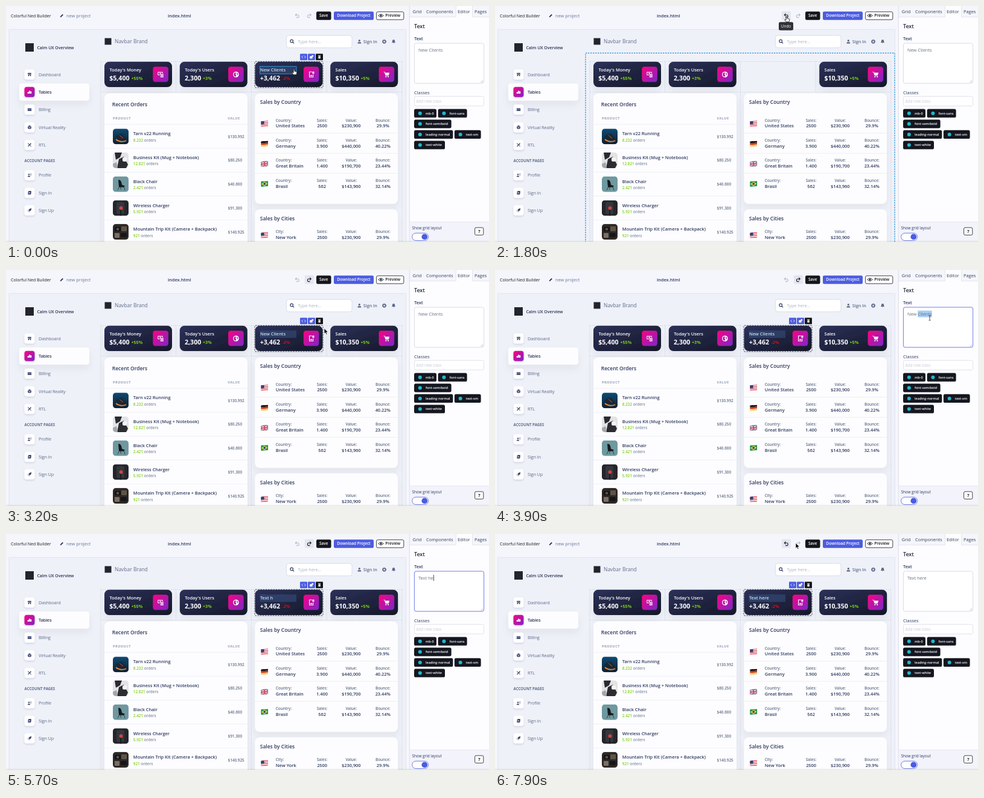
An HTML page that plays this animation: 800x393 px, repeating every 8000 ms.

```html
<!DOCTYPE html>
<html lang="en">
<head>
<meta charset="utf-8">
<title>Page builder</title>
<style>
  html, body { margin: 0; width: 100%; height: 100%; overflow: hidden; background: #f5f6fc; }
  svg { display: block; width: 100vw; height: 100vh; }
  text { font-family: "Open Sans", "Noto Sans", sans-serif; white-space: pre; }
</style>
</head>
<body>
<svg id="stage" viewBox="0 0 800 393" xmlns="http://www.w3.org/2000/svg"></svg>
<script>
const INK = '#2e3a5e', SOFT = '#5f6c88', MUTED = '#7d8ca6', LIME = '#7ed016';
const BLUE = '#4c5ce0', BLACK = '#14161c';
const LOOP = 8000, TYPE_START = 4780, KEY_GAP = 140, LAG = 150;
const OLD_TEXT = 'New Clients', NEW_TEXT = 'Text here';

const text = (x, y, s, size = 7.42, fill = INK, weight = 400, extra = '') =>
  `<text x="${x}" y="${y}" font-size="${size}" fill="${fill}" font-weight="${weight}" ${extra}>${s}</text>`;
const mid = (x, y, s, size, fill, weight) => text(x, y, s, size, fill, weight, 'text-anchor="middle"');
const rect = (x, y, w, h, fill, r = 0, extra = '') =>
  `<rect x="${x}" y="${y}" width="${w}" height="${h}" rx="${r}" fill="${fill}" ${extra}/>`;
const box = (x, y, w, h, fill, stroke, r = 3) =>
  rect(x, y, w, h, fill, r, `stroke="${stroke}" stroke-width=".8"`);
const circle = (x, y, r, fill, extra = '') => `<circle cx="${x}" cy="${y}" r="${r}" fill="${fill}" ${extra}/>`;
const path = (d, fill, extra = '') => `<path d="${d}" fill="${fill}" ${extra}/>`;
const line = (d, stroke, w = .8, extra = '') =>
  path(d, 'none', `stroke="${stroke}" stroke-width="${w}" ${extra}`);
const group = (s, attr) => `<g ${attr}>${s}</g>`;
const at = (x, y, s, scale = 1) => group(s, `transform="translate(${x} ${y}) scale(${scale})"`);

// Icon shapes live in an 8 by 8 box.
const shapes = {
  shop: 'M.6 .8H7.4L8 3H0ZM1 3.6H7V7.5H5V5H3V7.5H1Z',
  bars: 'M0 3.5H2.4V7.5H0ZM2.9 1H5.1V7.5H2.9ZM5.6 2.5H8V7.5H5.6Z',
  card: 'M0 1.2H8V2.8H0ZM0 3.6H8V6.8H0Z',
  cube: 'M4 0L7.4 1.8L4 3.6L.6 1.8ZM.4 2.5L3.6 4.2V8L.4 6.2ZM7.6 2.5L4.4 4.2V8L7.6 6.2Z',
  tools: 'M1 .2L7.8 7L7 7.8L.2 1ZM6.4 .2L7.8 1.6L4.9 4.3L3.7 3.1ZM3 4L4 5L1.6 7.8L.2 6.4Z',
  person: 'M2.8 .8A1.6 1.6 0 1 1 2.79 .8ZM0 7.5C0 4 5.6 4 5.6 7.5ZM5.6 1H8V2H5.6ZM5.6 3H8V4H5.6Z',
  page: 'M1.8 .4H7.4V6H6.4V7.6H.8V2H1.8ZM2.2 3.2H5.4V4H2.2ZM2.2 5H4.6V5.8H2.2Z',
  rocket: 'M8 0C5 0 3 1.5 2 3.5L4.5 6C6.5 5 8 3 8 0ZM1.5 3L0 4.5L1.5 4.8ZM5 6.5L3.5 8L3.2 6.5ZM1.5 5.5L2.5 6.5L.5 7.5Z',
  money: 'M0 .5H7V3H6.2V1.3H.8V4.2H3V5H0ZM3.6 3.6H8V4.6H3.6ZM3.6 5.3H8V6.3H3.6ZM3.6 7H8V8H3.6ZM2.6 2H4.4V3.4H2.6Z',
  globe: 'M4 0A4 4 0 1 1 3.99 0ZM3.4 1L4.2 2.4L3 3.6L4.4 4.8L3.8 7.1A3.1 3.1 0 0 1 3.4 1ZM5.2 1.4L7 3.4L6 5L5 3Z',
  report: 'M1 0H5V.9H1.9V7.1H6.1V4H7V8H1ZM2.8 4.8H5.2V6.2H2.8ZM5.6 0H8V3H5.6Z',
  cart: 'M0 .3H1.6L2 1.5H8L7 5H2.4L1.1 1.1H0ZM2.4 5.4H7V6H2.4ZM3.2 6.4A.8 .8 0 1 1 3.19 6.4ZM6.4 6.4A.8 .8 0 1 1 6.39 6.4Z',
  user: 'M4 0A2 2 0 1 1 3.99 0ZM.5 8V6.6C.5 4.2 7.5 4.2 7.5 6.6V8Z',
  bell: 'M4 0C6.4 0 6.6 2 6.6 4L7.7 6.2H.3L1.4 4C1.4 2 1.6 0 4 0ZM3 6.8H5A1 1 0 0 1 3 6.8Z',
  pencil: 'M0 8L.6 5.6L5.6 .6L7.4 2.4L2.4 7.4Z'
};
const icon = (name, cx, cy, size, fill) =>
  at(cx - size / 2, cy - size / 2, path(shapes[name], fill, 'fill-rule="evenodd"'), size / 8);

const defs = `<defs>
  <linearGradient id="dark" x1="1" y1="1" x2="0" y2="0"><stop stop-color="#141727"/><stop offset="1" stop-color="#2c3159"/></linearGradient>
  <linearGradient id="pink" x1="1" y1="1" x2="0" y2="0"><stop stop-color="#7928ca"/><stop offset="1" stop-color="#ff0080"/></linearGradient>
  <linearGradient id="sea" x1="0" y1="0" x2="0" y2="1"><stop stop-color="#0d4a76"/><stop offset="1" stop-color="#10202e"/></linearGradient>
  <linearGradient id="foot" x1="0" y1="0" x2="0" y2="1"><stop stop-color="#000" stop-opacity="0"/><stop offset="1" stop-color="#000" stop-opacity=".09"/></linearGradient>
  <filter id="shade" x="-25%" y="-60%" width="150%" height="260%"><feDropShadow dx="0" dy="7" stdDeviation="6" flood-color="#000" flood-opacity=".055"/></filter>
  <filter id="lift" x="-50%" y="-50%" width="200%" height="220%"><feDropShadow dx="0" dy="1.5" stdDeviation="1.6" flood-color="#1f2a4a" flood-opacity=".16"/></filter>
  <clipPath id="thumb"><rect width="26" height="26" rx="5"/></clipPath>
  <clipPath id="flag"><rect width="12" height="9" rx=".6"/></clipPath>
</defs>`;

function topBar() {
  const eye = line('M616.8 16Q621 11.4 625.2 16Q621 20.6 616.8 16Z', BLACK, .9) + circle(621, 16, 1.4, BLACK);
  return text(8, 18.7, 'Colorful Ned Builder', 7, '#181a22') +
    icon('pencil', 92.5, 16, 5.6, INK) + text(100, 18.7, 'new project', 7.42, '#65739a') +
    text(268, 18.7, 'index.html', 7.45, INK, 600) +
    rect(514, 9.3, 24.5, 13.9, BLACK, 2.2) + mid(526.2, 18.4, 'Save', 6.4, '#fff', 600) +
    rect(543, 9.3, 66, 13.9, BLUE, 2.2) + mid(576, 18.4, 'Download Project', 6.5, '#fff', 600) +
    box(613.6, 9.7, 45.2, 13.1, '#fff', BLACK, 2.2) + eye + text(628.3, 18.4, 'Preview', 6.6, BLACK, 600);
}

function sidebar() {
  const items = [['Dashboard', 'shop', 114], ['Tables', 'bars', 143.3], ['Billing', 'card', 172.6],
    ['Virtual Reality', 'cube', 202], ['RTL', 'tools', 231.3], ['Profile', 'person', 281.7],
    ['Sign In', 'page', 311], ['Sign Up', 'rocket', 340.3]];
  let s = rect(32, 62, 14, 14, '#22252e') + text(51.5, 71.7, 'Calm UX Overview', 6.9, '#262f4c', 600) +
    text(30.5, 260.4, 'ACCOUNT PAGES', 6.2, SOFT, 700) +
    rect(22, 129, 116, 28.4, '#fdfdff', 4.2, 'filter="url(#shade)"');
  for (const [name, shape, y] of items) {
    const on = name === 'Tables';
    s += rect(30.5, y - 8.5, 17, 17, on ? 'url(#pink)' : '#fff', 4, 'filter="url(#lift)"') +
      icon(shape, 39, y, 6.4, on ? '#fff' : '#3a416f') +
      text(54, y + 2.7, name, 7.42, on ? INK : SOFT, on ? 600 : 400, 'letter-spacing="-.18"');
  }
  return s;
}

const navbar = () =>
  rect(163.5, 53.5, 11, 11, '#22252e') + text(180, 62.3, 'Navbar Brand', 8.48, SOFT) +
  box(464.4, 49, 108.6, 20.6, '#fff', '#d2d6df', 4) +
  circle(473.2, 58.4, 2.3, 'none', `stroke="${INK}" stroke-width="1.1"`) + line('M475 60.2L477 62.4', INK, 1.2) +
  text(483.5, 62, 'Type here...', 7.2, '#a9b2c2') +
  icon('user', 585.3, 59.3, 6.6, SOFT) + text(591.7, 62, 'Sign In', 7.2, SOFT, 600) +
  circle(626.5, 59.3, 2.2, 'none', `stroke="${SOFT}" stroke-width="1.7"`) +
  circle(626.5, 59.3, 3.2, 'none', `stroke="${SOFT}" stroke-width="1" stroke-dasharray="1.35 1.16"`) +
  icon('bell', 642, 59.3, 6.6, SOFT);

function stat(x, label, value, rate, rateX, shape) {
  return rect(x, 92.7, 112, 42.4, 'url(#dark)', 8, 'filter="url(#shade)"') +
    text(x + 8.4, 109.4, label, 7.42, '#fff', 600, label === OLD_TEXT ? 'id="cardText"' : '') +
    text(x + 8.2, 123.5, value, 10.6, '#fff', 700) +
    text(rateX, 123.3, rate, 7.2, rate[0] === '-' ? '#ea0606' : LIME, 700) +
    rect(x + 80.3, 100.9, 25.6, 25.6, 'url(#pink)', 4.2) + icon(shape, x + 93.1, 114, 9.6, '#fff');
}

const photos = [
  rect(0, 0, 26, 26, 'url(#sea)') + path('M4 13L14 8L23 17L20 21L8 18Z', '#1b2733') +
    line('M5 18Q13 24 22 20', '#e8893b', 1.8) + line('M11 11L17 16', '#c9583a', 1),
  rect(0, 0, 26, 26, '#e2e4e6') + path('M3 0H15L12 8L5 12Z', '#2a2b2f') + path('M10 11L18 7L25 20L22 26H7Z', '#2c2d31') +
    rect(16, 8, 7, 7, '#f4f4f4', 2) + path('M0 19L6 16L8 26H0Z', '#a3a7aa'),
  rect(0, 0, 26, 26, '#6e999f') + path('M9 6Q14 5 15 14L20 16L18 18H10Z', '#16191c') +
    line('M11 17L8 23M13 17V22M18 17L20 23', '#22282b', .8),
  rect(0, 0, 26, 26, '#24262b') + rect(6, 3, 13, 20, '#33363d', 3) + circle(13.5, 13, 3, '#d0433c') +
    line('M13 16V26', '#15171a', 1.6),
  rect(0, 0, 26, 26, '#2d2825') + rect(3, 5, 10, 7, '#141414', 1) + circle(8, 8.5, 2.2, '#5b5754') +
    rect(14, 4, 9, 8, '#5f5347', 1) + rect(3, 15, 8, 8, '#7a6f64', 1) + rect(13, 15, 10, 7, '#151719', 1)
];

function orders() {
  const rows = [['Tarn v22 Running', '8.232', '$130.992'], ['Business Kit (Mug + Notebook)', '12.821', '$80.250'],
    ['Black Chair', '2.421', '$40.600'], ['Wireless Charger', '5.921', '$91.300'],
    ['Mountain Trip Kit (Camera + Backpack)', '921', '$140.925']];
  const head = 'letter-spacing=".5"';
  let s = rect(163, 145.4, 237, 270, '#fdfdff', 8.4, 'filter="url(#shade)"') +
    text(175.8, 166.7, 'Recent Orders', 8.48, INK, 600) +
    text(177, 188.6, 'PRODUCT', 5.5, '#929fb6', 700, head) + text(367.6, 188.6, 'VALUE', 5.5, '#929fb6', 700, head);
  rows.forEach(([name, count, value], i) => {
    const y = 217.3 + i * 39.7;
    s += line(`M163 ${y - 20}H400`, '#e9ebf2', .7) +
      at(177, y - 13, group(photos[i], 'clip-path="url(#thumb)"')) +
      text(210.8, y - 1.9, name, 7.42, INK, 600) +
      text(210.8, y + 8.4, `<tspan fill="${LIME}">${count}</tspan> orders`, 6.36, MUTED, 600) +
      text(367.6, y + 2.4, value, 6.36, SOFT, 600);
  });
  return s;
}

const bands = (colors, h) => colors.map((c, i) => rect(0, i * h, 12, h + .1, c)).join('');
const cross = (c, w) => line('M6 0V9M0 4.5H12', c, w);
const flags = {
  us: bands(['#d3303f', '#fff', '#d3303f', '#fff', '#d3303f', '#fff', '#d3303f'], 9 / 7) + rect(0, 0, 5.4, 5, '#2c3f83'),
  de: bands(['#15151a', '#dc2430', '#f8cc2e'], 3),
  gb: rect(0, 0, 12, 9, '#2a3c80') + line('M0 0L12 9M12 0L0 9', '#fff', 1.8) + line('M0 0L12 9M12 0L0 9', '#d02b3c', .6) +
    cross('#fff', 2.8) + cross('#d02b3c', 1.6),
  br: rect(0, 0, 12, 9, '#24964a') + path('M6 1L11 4.5L6 8L1 4.5Z', '#f8d433') + circle(6, 4.5, 1.9, '#2b4394')
};

function place(y, flag, label, name, ...cells) {
  let s = group(group(flags[flag], 'clip-path="url(#flag)"'), `transform="translate(422.2 ${y + 1.5}) skewY(-4)"`) +
    text(446.8, y + 2.2, label, 6.36, SOFT, 600) + text(446.8, y + 12, name, 7.42, INK, 600);
  [['Sales:', 523.6], ['Value:', 571.8], ['Bounce:', 624.3]].forEach(([title, x], i) => {
    s += mid(x, y + 2.2, title, 6.36, SOFT, 600) + mid(x, y + 12, cells[i], 7.42, INK, 600);
  });
  return s;
}

function sales() {
  const rows = [['us', 'Country:', 'United States', '2500', '$230,900', '29.9%'],
    ['de', 'Country:', 'Germany', '3.900', '$440,000', '40.22%'],
    ['gb', 'Country:', 'Great Britain', '1.400', '$190,700', '23.44%'],
    ['br', 'Country:', 'Brasil', '562', '$143,960', '32.14%']];
  let s = rect(412.3, 145.4, 236.7, 184.2, '#fdfdff', 8.4, 'filter="url(#shade)"') +
    text(420.8, 162.7, 'Sales by Country', 8.48, INK, 600);
  rows.forEach((row, i) => {
    const y = 190.4 + i * 33.4;
    if (i) s += line(`M412.3 ${y - 12}H649`, '#e6e8f0', .7);
    s += place(y, ...row);
  });
  return s + rect(412.3, 338.4, 236.7, 90, '#fdfdff', 8.4, 'filter="url(#shade)"') +
    text(420.8, 356.8, 'Sales by Cities', 8.48, INK, 600) +
    place(376, 'us', 'City:', 'New York', '2500', '$230,900', '29.9%');
}

function panel() {
  const tabs = [['Grid', 673.5], ['Components', 696], ['Editor', 748], ['Pages', 776]];
  const chips = [['mb-0', 676, 0, 37], ['font-sans', 715.6, 0, 48], ['font-semibold', 676, 1, 61.6],
    ['leading-normal', 676, 2, 64.3], ['text-sm', 742.8, 2, 43.8], ['text-white', 676, 3, 51]];
  let s = rect(668, 0, 132, 393, '#fdfdff') + rect(668, 0, 132, 18, '#f5f6fc') + rect(745.5, 0, 27, 18.6, '#fdfdff') +
    line('M668 18.3H745.3V0M772.7 0V18.3H800', '#dadde8', .7) + line('M668.4 0V393', '#d4d7e2') +
    rect(668.8, 359.5, 131.2, 34, '#f2f3fb') + line('M668 359.5H800', '#dfe2ed', .7);
  for (const [name, x] of tabs) s += text(x, 11.7, name, 7.42, '#333d58');
  s += text(676, 36.6, 'Text', 8.9, '#22283a', 600) + text(676, 57, 'Text', 7.42, INK, 600) +
    text(676, 146.8, 'Classes', 7.42, INK, 500) + box(676.4, 150.4, 115.2, 16.2, '#fff', '#d9dce7') +
    text(679.6, 160.8, 'Add new class', 6.36, '#c3c8d5');
  for (const [name, x, row, w] of chips) {
    const y = 171.6 + row * 17.6;
    s += rect(x, y, w, 14.2, '#14171f', 2.6) + circle(x + 9.8, y + 7.1, 3, '#22b8cf') +
      text(x + 19, y + 9, name, 5.5, '#fff', 600);
  }
  return s + text(672.4, 371.9, 'Show grid layout', 6.36, INK) +
    box(672.6, 378.2, 27, 12.4, '#fff', BLUE, 6.2) + circle(693.3, 384.4, 4.9, BLUE) +
    box(776.6, 369, 14.2, 12.4, '#fff', BLACK, 2) + mid(783.7, 378.1, '?', 7.6, BLACK, 700);
}

const history = (id, x, flip) => `<g id="${id}">` + rect(x - 7.5, 8.8, 15, 14.4, '#e3e6f0', 2, 'class="plate"') +
  group(line('M-2.6 -1.2H.6A2.3 2.3 0 0 1 .6 3.4H-1.2M-.8 -3.4L-3 -1.2L-.8 1', 'currentColor', 1.1),
    `transform="translate(${x} 16) scale(${flip} 1)"`) + '</g>';

const toolbar = () =>
  rect(412, 92.3, 113, 43.6, 'none', 1, 'stroke="#4b4f5c" stroke-width="1" stroke-dasharray="2.6 1.6"') +
  rect(420.5, 100.6, 60.5, 12.4, '#4a7bb5', 0, 'fill-opacity=".28"') +
  rect(487, 79.4, 12, 10.8, BLUE, 1) + rect(500, 79.4, 12, 10.8, BLUE, 1) + rect(513, 79.4, 12, 10.8, BLACK, 1) +
  line('M491.8 82.8L489.8 84.8L491.8 86.8M494.2 82.8L496.2 84.8L494.2 86.8', '#fff', .8) +
  rect(503.2, 83.4, 4.4, 4, '#fff', .6) + circle(507.8, 83.2, 1.4, '#fff') +
  rect(517.4, 83.4, 3.4, 4.2, '#fff', .4) + rect(517, 82, 4.2, .8, '#fff');

const textArea = () =>
  box(676.4, 62, 115.2, 66.8, '#fff', '#d0d4df').replace('<rect', '<rect id="area"') +
  rect(0, 67.6, 0, 11, '#a9cdf2', 0, 'id="mark"') + text(683, 75.8, OLD_TEXT, 7.42, '#667086', 400, 'id="areaText"') +
  rect(0, 68, .8, 10, '#222', 0, 'id="caret"') + line('M786.6 127.4L790 124M788.8 127.4L790 126.2', '#8a8f9c', .6);

const pointers = {
  arrow: path('M0 0V9L2.1 7.1L3.5 10.3L5 9.6L3.6 6.5H6.4Z', '#000', 'stroke="#fff" stroke-width=".7"'),
  hand: path('M-.9 .8Q0 -.8 .9 .8V3.6L4.2 4.4Q5 4.8 4.8 6L4 9.4H-1L-3.2 6.2Q-3 4.8 -1.8 5.6L-.9 6.4Z', '#fff',
    'stroke="#111" stroke-width=".8"'),
  beam: line('M-1.6 -4H-.4L0 -3.6L.4 -4H1.6M0 -3.6V3.6M-1.6 4H-.4L0 3.6L.4 4H1.6', '#222', .8)
};

const stage = document.getElementById('stage');
stage.innerHTML = defs + rect(0, 0, 800, 393, '#f5f6fc') + rect(5, 39, 657.5, 360, '#eff1f9') +
  line('M5 393V39.2H662.4V393', '#dcdfec', .8) + topBar() + sidebar() + navbar() +
  stat(163, "Today's Money", '$5,400', '+55%', 207.4, 'money') + stat(287.8, "Today's Users", '2,300', '+3%', 326, 'globe') +
  group(stat(412.5, OLD_TEXT, '+3,462', '-2%', 457.5, 'report'), 'id="client"') +
  stat(537.2, 'Sales', '$10,350', '+5%', 587.5, 'cart') + orders() + sales() +
  line('M157 92.4H656M157 143.4H656M157 92.4V393M281.6 92.4V143.4M406.4 92.4V393M531 92.4V143.4M655.8 92.4V393',
    '#b9bdcb', .5, 'stroke-dasharray="2 1.5"') +
  rect(150, 78.4, 512, 340, 'none', 0, 'id="frame" stroke="#2391d3" stroke-width="1.2" stroke-dasharray="2.4 1.6"') +
  group(toolbar(), 'id="tools"') +
  rect(420.5, 100.6, 60.5, 12.4, 'none', 0, 'id="hover" stroke="#2f9be0" stroke-width=".9"') +
  history('undo', 482.3, 1) + history('redo', 502.3, -1) + panel() + textArea() +
  rect(0, 390, 800, 3, 'url(#foot)') +
  group(rect(470, 26.8, 24, 13.6, '#303238', 2.5) + mid(482, 36, 'Undo', 6.4, '#fff', 400), 'id="tip"') +
  Object.keys(pointers).map(k => group(pointers[k], `id="${k}"`)).join('');

const el = id => document.getElementById(id);
const show = (id, on) => el(id).setAttribute('visibility', on ? 'visible' : 'hidden');
const within = (t, a, b) => t >= a && t < b;

// Pointer stops: time, x, y.
const stops = [[0, 477, 105], [400, 477, 105], [850, 519, 86], [1100, 520, 87], [1250, 520, 87], [1700, 483, 17],
  [2100, 483, 17], [2400, 462, 92], [2700, 444, 106], [3000, 444, 106], [3550, 718, 77], [3900, 720, 80],
  [6150, 720, 80], [6700, 484, 18], [7400, 484, 18], [7800, 498, 15], [LOOP, 498, 15]];

function pointerAt(t) {
  const i = stops.findIndex(s => s[0] > t);
  const [t0, x0, y0] = stops[i - 1], [t1, x1, y1] = stops[i];
  const p = (t - t0) / (t1 - t0), e = p * p * (3 - 2 * p);
  return [x0 + (x1 - x0) * e, y0 + (y1 - y0) * e];
}

const typedAt = t => t < TYPE_START ? OLD_TEXT : NEW_TEXT.slice(0, Math.floor((t - TYPE_START) / KEY_GAP) + 1);

function setHistory(id, on) {
  el(id).style.color = on ? '#22252e' : '#b7bdca';
  el(id).querySelector('.plate').setAttribute('opacity', on ? 1 : 0);
}

function drawEditor(t) {
  const words = el('areaText'), typed = typedAt(t), focused = within(t, 3600, 7200);
  words.textContent = typed;
  el('cardText').textContent = typedAt(t - LAG);
  el('area').setAttribute('stroke', focused ? BLUE : '#d0d4df');

  const marked = within(t, 3700, TYPE_START);
  show('mark', marked);
  if (marked) {
    const from = t < 4200 ? words.getSubStringLength(0, 4) : 0;
    el('mark').setAttribute('x', 683 + from);
    el('mark').setAttribute('width', words.getComputedTextLength() - from);
  }
  const lastKey = TYPE_START + KEY_GAP * (NEW_TEXT.length - 1);
  const blinkOn = t < lastKey || (t - lastKey) % 1000 < 500;
  show('caret', focused && t >= TYPE_START && blinkOn);
  el('caret').setAttribute('x', 683.2 + words.getComputedTextLength());
}

function draw(t) {
  const [x, y] = pointerAt(t);
  const onUndo = Math.abs(x - 482.3) < 8 && y < 24;
  const onLabel = within(x, 420, 481) && within(y, 100, 113);
  const selected = t < 1000 || t >= 2900;
  show('client', !within(t, 1000, 2000));
  show('frame', !selected);
  show('tools', selected);
  show('hover', onLabel);
  show('tip', onUndo);
  setHistory('undo', within(t, 1000, 2000) || t >= 6200);
  setHistory('redo', within(t, 2000, 6200));
  drawEditor(t);

  const kind = within(t, TYPE_START, 6150) ? '' : x > 676 ? 'beam' : t < 1000 || onUndo || onLabel ? 'hand' : 'arrow';
  for (const k in pointers) {
    show(k, k === kind);
    el(k).setAttribute('transform', `translate(${x} ${y})`);
  }
}

const start = performance.now();
function tick() {
  draw((performance.now() - start) % LOOP);
  requestAnimationFrame(tick);
}
tick();
</script>
</body>
</html>
```
